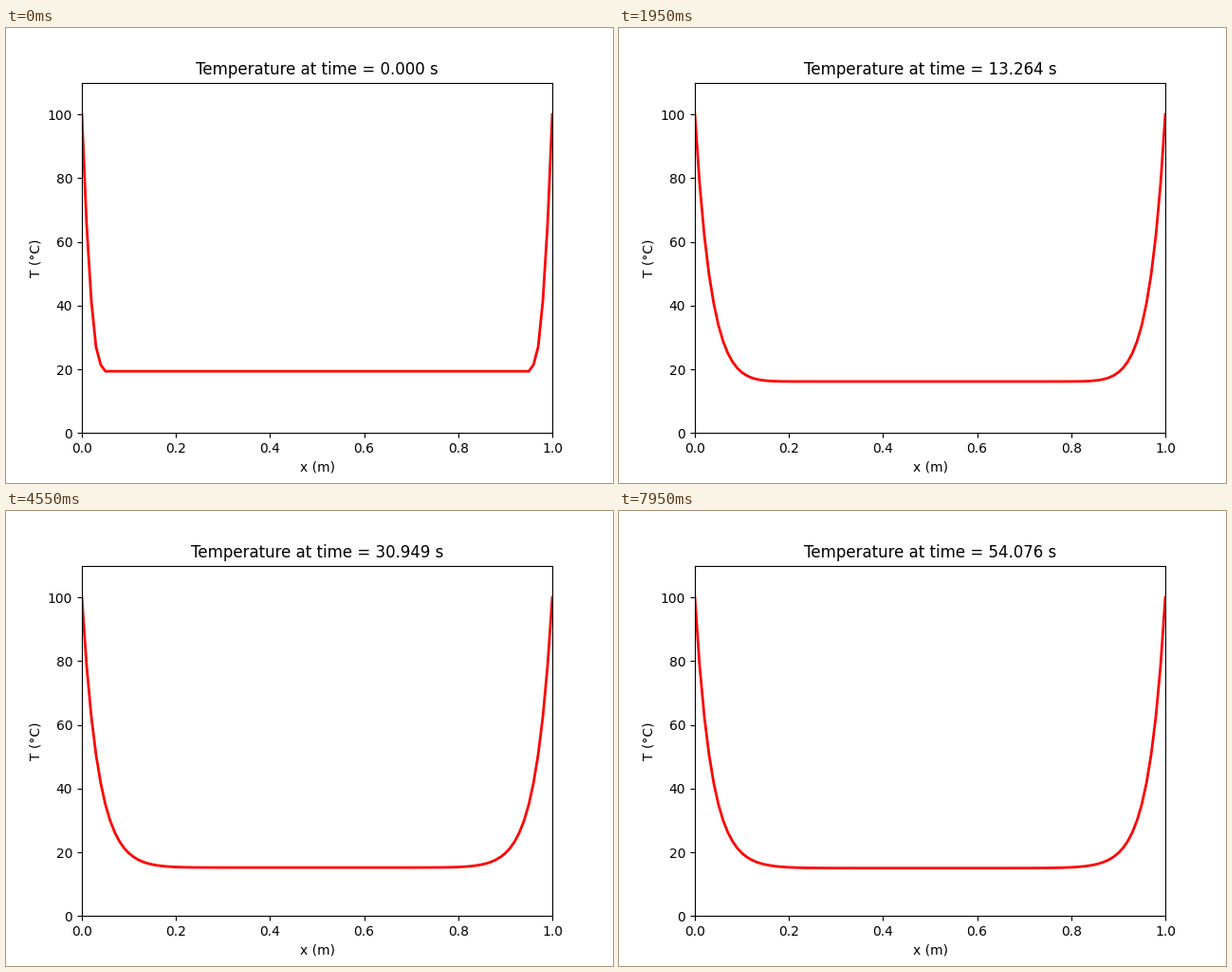
A matplotlib script for the animation above (8 s loop, 640 by 480 pixels).

```python
import numpy as np
import matplotlib.pyplot as plt
from matplotlib.animation import FuncAnimation

FRAMES, INTERVAL = 160, 50
NODES = 101
DT = 0.340102          # seconds per step
R = 0.4                # diffusion number
LOSS = 0.0336          # share of excess heat lost to the air per step
T_AIR, T_START, T_END = 15.0, 20.0, 100.0
WARMUP = 4             # steps taken before the first picture


def step(T):
    new = T.copy()
    mid = T[1:-1]
    new[1:-1] = mid + R * (T[2:] - 2 * mid + T[:-2]) - LOSS * (mid - T_AIR)
    return new


def solve():
    T = np.full(NODES, T_START)
    T[0] = T[-1] = T_END
    for _ in range(WARMUP):
        T = step(T)
    history = [T]
    for _ in range(FRAMES - 1):
        history.append(step(history[-1]))
    return history


x = np.linspace(0, 1, NODES)
history = solve()

fig, ax = plt.subplots(figsize=(6.4, 4.8), dpi=100)
ax.set_xlim(0, 1)
ax.set_ylim(0, 110)
ax.set_xlabel("x (m)")
ax.set_ylabel("T (°C)")
line, = ax.plot(x, history[0], color="red", lw=2)
title = ax.set_title("")


def update(i):
    line.set_ydata(history[i])
    title.set_text(f"Temperature at time = {i * DT:.3f} s")
    return line, title


anim = FuncAnimation(fig, update, frames=FRAMES, interval=INTERVAL,
                     repeat=True, repeat_delay=0)
plt.show()
```
